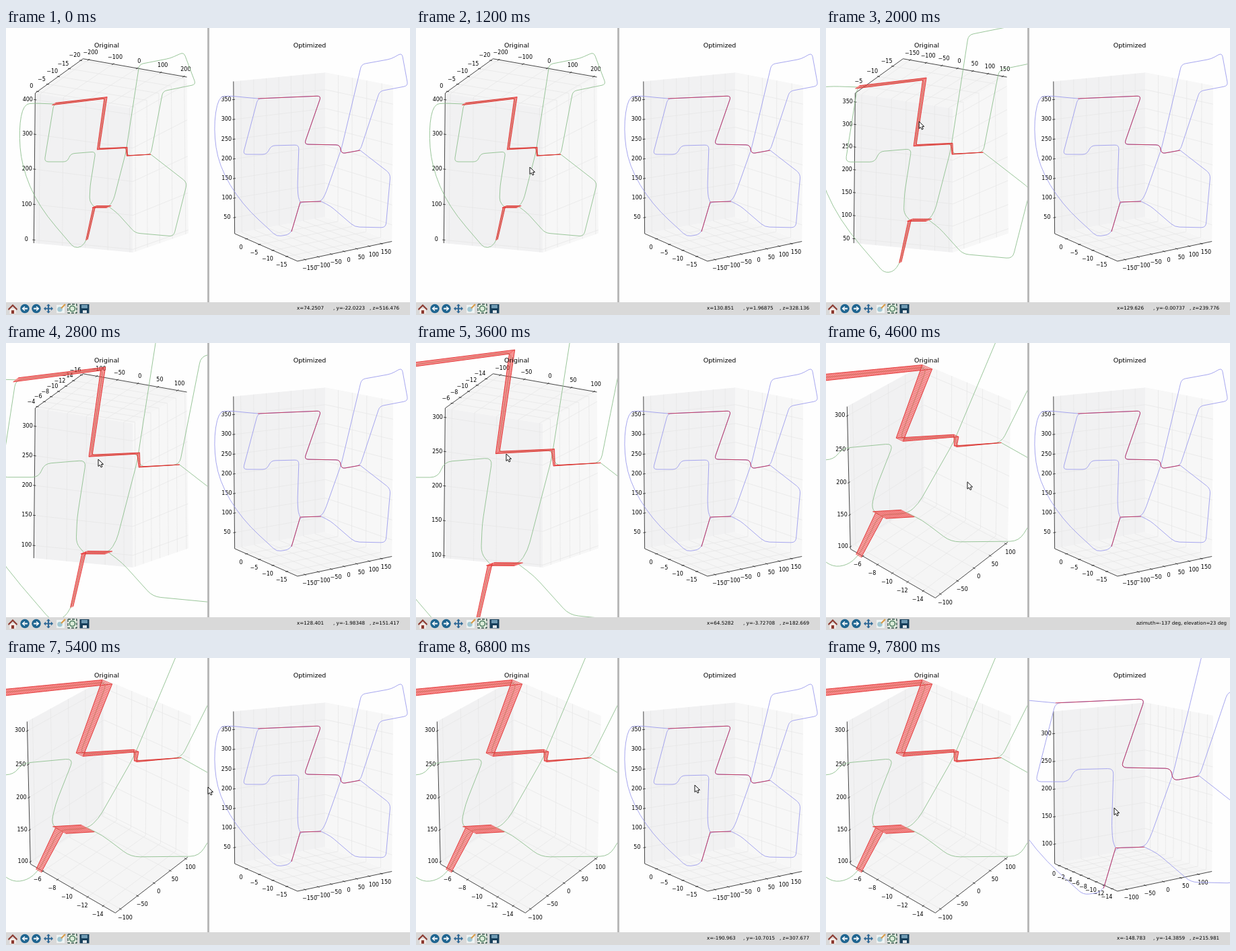
These frames come from a looping animation (600 by 427 pixels, 8000 ms). An HTML page with a canvas:

```html
<!DOCTYPE html>
<html lang="en">
<head>
<meta charset="utf-8">
<title>Trajectory comparison</title>
<style>
html, body { margin: 0; height: 100%; overflow: hidden; background: #fefefe; }
canvas { display: block; width: 100vw; height: 100vh; }
</style>
</head>
<body>
<canvas id="stage" width="600" height="427"></canvas>
<script>
const ctx = document.getElementById('stage').getContext('2d');
const LOOP = 8000, STEP = 200, FONT = '"DejaVu Sans", sans-serif';

const points = text => text.trim().split(/\s+/).map(p => p.split(',').map(Number));
const mix = (a, b, k) => a.map((v, i) => v + (b[i] - v) * k);
const dot = (a, b) => a.reduce((sum, v, i) => sum + v * b[i], 0);
const distance = (p, q) => Math.hypot(q[0] - p[0], q[1] - p[1]);

// Rows are [time, value, ...]; values run linearly between rows.
function track(t, rows) {
  const i = rows.findIndex(r => r[0] > t);
  if (i === 0) return rows[0].slice(1);
  if (i < 0) return rows[rows.length - 1].slice(1);
  const [a, b] = [rows[i - 1], rows[i]];
  return mix(a, b, (t - a[0]) / (b[0] - a[0])).slice(1);
}

// Perspective view of the unit cube from 10 units away.
const DIST = 10, PLANE = { normal: [.85, 1, .64], offset: .175 };
function camera(centerX, azimuth, elevation) {
  const [az, el] = [azimuth, elevation].map(deg => deg * Math.PI / 180);
  const [c, s] = [Math.cos(el), Math.sin(el)];
  const right = [-Math.sin(az), Math.cos(az), 0];
  const up = [-Math.cos(az) * s, -Math.sin(az) * s, c];
  const toEye = [Math.cos(az) * c, Math.sin(az) * c, s];
  return {
    project(p) {
      const k = DIST / (DIST - dot(p, toEye));
      return [centerX + 169 * k * dot(p, right), 198 - 232 * k * dot(p, up)];
    },
    // Puts a screen point onto the sloping plane that holds the route.
    lift([x, y]) {
      const a = (x - centerX) / 169 / DIST, b = (198 - y) / 232 / DIST;
      const ray = toEye.map((v, i) => a * right[i] + b * up[i] - v);
      const depth = (PLANE.offset - DIST * dot(PLANE.normal, toEye)) / dot(PLANE.normal, ray);
      return toEye.map((v, i) => DIST * v + depth * ray[i]);
    }
  };
}

const leftCamera = t => track(t, [[3600, -117, -11], [4200, -136, 22], [4600, -139, 24.5]]);
const RIGHT = camera(455, -125, 9);

// Corners as seen in the opening view: the loop, then the side branch.
const BRANCH = 30;
const leftRoute = points(`131,266 124,258 125,235 133,184 96,187 91,199 57,199
  71,113 148,104 137,180 179,178 180,190 215,188 233,94 282,84 264,36 244,45 198,54
  178,185 160,255 153,266 131,266 120,315 112,326 101,327 48,265 23,205 19,150 26,113 44,112
  269,230 249,310 192,305 165,275`).map(camera(153.6, ...leftCamera(0)).lift);
const rightRoute = points(`437,259 434,252 433,235 435,174 394,175 387,188 352,188
  374,105 468,101 443,173 496,174 498,187 526,182 555,94 597,86 588,37 572,46 528,54
  498,180 474,248 468,258 437,259 424,303 418,308 402,310 350,262 316,205 308,150 315,102 332,101
  571,217 564,297 518,296 482,265`).map(RIGHT.lift);

// Stretches driven twice, with the gap between both passes at either end.
const shared = [
  { from: 7, to: 12, gap: [1, 0] },
  { from: 20, to: 21, gap: [1.2, 1.2] },
  { from: 21, to: 22, gap: [.7, .5] }
];

function stroke(color, width) {
  ctx.strokeStyle = color;
  ctx.lineWidth = width;
  ctx.stroke();
}
function trace(pts) {
  ctx.beginPath();
  pts.forEach(p => ctx.lineTo(...p));
}
function strokePath(pts, color, width) {
  trace(pts);
  stroke(color, width);
}
function fillPath(pts, color) {
  trace(pts);
  ctx.fillStyle = color;
  ctx.fill();
}
const rect = (color, x, y, w, h) => fillPath([[x, y], [x + w, y], [x + w, y + h], [x, y + h]], color);

function strokeRounded(pts, radius, color, width) {
  ctx.beginPath();
  ctx.moveTo(...pts[0]);
  for (let i = 1; i < pts.length - 1; i++) {
    const toward = q => mix(pts[i], q, Math.min(radius(i) / distance(pts[i], q), .5));
    ctx.lineTo(...toward(pts[i - 1]));
    ctx.quadraticCurveTo(...pts[i], ...toward(pts[i + 1]));
  }
  ctx.lineTo(...pts[pts.length - 1]);
  stroke(color, width);
}

function label(text, x, y, size, align = 'center') {
  ctx.font = `${size}px ${FONT}`;
  ctx.textAlign = align;
  ctx.textBaseline = 'middle';
  ctx.fillStyle = '#000';
  ctx.fillText(text, x, y);
}

// axes: [centre, half range] for x, y and z at zoom 1
function drawAxes(project, axes, zoom, onFloor) {
  // u, v, w run from the maximum of x, y, z to the minimum
  const at = (...uvw) => project(uvw.map(k => .5 - k));
  const base = onFloor ? 1 : 0, far = 1 - base;
  const pane = (color, ...corners) => fillPath(corners.map(c => at(...c)), color);
  pane('#f5f5f5', [0, 0, base], [1, 0, base], [1, 1, base], [0, 1, base]);
  pane('#f1f1f2', [0, 0, 0], [1, 0, 0], [1, 0, 1], [0, 0, 1]);
  pane('#f7f7f7', [0, 0, 0], [0, 1, 0], [0, 1, 1], [0, 0, 1]);

  // Each grid line starts on its axis and folds over two panes.
  const lines = [
    u => [at(u, 1, base), at(u, 0, base), at(u, 0, far)],
    v => [at(1, v, base), at(0, v, base), at(0, v, far)],
    w => [at(1, 0, w), at(0, 0, w), at(0, 1, w)]
  ];
  const offsets = onFloor ? [[7, 13], [-8, 13], [-11, 0]] : [[3, -10], [-9, -7], [-11, 0]];
  const ticks = [];
  axes.forEach(([centre, half], k) => {
    const range = 2 * half / zoom, max = centre + range / 2;
    const step = [2, 5, 20, 50, 100].find(s => range / s < 8.5);
    for (let n = Math.ceil((max - range) / step); n * step <= max; n++) {
      const line = lines[k]((max - n * step) / range);
      strokePath(line, '#e6e6e6', .7);
      ticks.push({ line, value: n * step, offset: offsets[k] });
    }
  });
  lines.forEach(line => strokePath([line(0)[0], line(1)[0]], '#333', .9));
  for (const { line: [p, q], value, offset } of ticks) {
    const k = 2 / distance(p, q);
    strokePath([mix(p, q, -k), mix(p, q, k)], '#333', .9);
    label(String(value).replace('-', '\u2212'), p[0] + offset[0], p[1] + offset[1], 8);
  }
}

function drawRoute(route, zoom, color) {
  const wideBend = i => i >= 25 && i < 29;
  strokeRounded([...route.slice(0, BRANCH), route[7]], i => wideBend(i) ? 999 : 6 * zoom, color, .9);
  strokeRounded([route[12], ...route.slice(BRANCH), route[20]], () => 7 * zoom, color, .9);
}

function drawBand(route, project, { from, to, gap }) {
  const side = sign => route.slice(from, to + 1).map(([x, y, z], i) => {
    const [width] = mix([gap[0]], [gap[1]], i / (to - from));
    return project([x, y + sign * width * .035, z]);
  });
  const a = side(1), b = side(-1);
  fillPath([...a, ...b.slice().reverse()], 'rgba(245,70,70,.45)');
  for (let i = 1; i < a.length; i++) {
    const n = Math.ceil(distance(a[i - 1], a[i]) / 2.6);
    for (let j = 0; j <= n; j++)
      strokePath([mix(a[i - 1], a[i], j / n), mix(b[i - 1], b[i], j / n)], 'rgba(230,40,40,.55)', .8);
  }
  strokePath(a, '#e03030', .9);
  strokePath(b, '#e03030', .9);
}

function clipped(x, width, draw) {
  ctx.save();
  ctx.beginPath();
  ctx.rect(x, 0, width, 408);
  ctx.clip();
  draw();
  ctx.restore();
}

const scaled = (route, zoom) => route.map(p => p.map(v => v * zoom));

function drawLeft(t) {
  const [zoom] = track(t, [[1400, 1], [3340, 1.97]]);
  const [azimuth, elevation] = leftCamera(t);
  const { project } = camera(153.6, azimuth, elevation);
  const route = scaled(leftRoute, zoom);
  // the gap grows with the zoom
  const bandProject = ([x, y, z]) => project([x * zoom, y * zoom, z * zoom]);
  clipped(0, 299, () => {
    drawAxes(project, [[-4, 218], [-9.9, 11.1], [205, 214]], zoom, elevation > 0);
    drawRoute(route.map(project), zoom, '#8fc08f');
    shared.forEach(s => drawBand(leftRoute, bandProject, s));
  });
  label('Original', 149.5, 26.5, 9.5);
}

function drawRight(t) {
  const [zoom] = track(t, [[7000, 1], [7800, 1.405]]);
  const route = scaled(rightRoute, zoom).map(RIGHT.project);
  clipped(302, 298, () => {
    drawAxes(RIGHT.project, [[8, 186], [-7, 11.7], [202, 193.5]], zoom, true);
    drawRoute(route, zoom, '#9c9cee');
    for (const { from, to } of shared)
      strokeRounded(route.slice(from, to + 1), () => 6 * zoom, '#c03a62', 1);
  });
  label('Optimized', 451, 26.5, 9.5);
}

function disc(x, y, r, color) {
  ctx.beginPath();
  ctx.arc(x, y, r, 0, 7);
  ctx.fillStyle = color;
  ctx.fill();
}

function drawToolbar() {
  rect('#d9d9d9', 0, 408, 600, 19);
  rect('#b9b9b9', 299, 0, 3, 408);
  // home
  rect('#f1e8e4', 5, 417, 10, 8);
  fillPath(points('3,418 10,411 17,418 16,420 10,414 4,420'), '#8c3a30');
  rect('#8c3a30', 8, 420, 4, 5);
  // back and forward
  for (const [x, d] of [[28, -1], [45, 1]]) {
    disc(x, 417.5, 6.7, '#1f6590');
    strokePath([[x - 4 * d, 417.5], [x + 3 * d, 417.5]], '#fff', 2);
    strokePath([[x, 414.5], [x + 3.5 * d, 417.5], [x, 420.5]], '#fff', 1.5);
  }
  // pan: one arrow turned four ways
  for (let i = 0; i < 4; i++) {
    ctx.save();
    ctx.translate(63, 417.5);
    ctx.rotate(i * Math.PI / 2);
    fillPath(points('-1,0 -1,-4 -3,-4 0,-7 3,-4 1,-4 1,0'), '#2d6795');
    ctx.restore();
  }
  // zoom
  rect('#eef3f3', 75, 412, 12, 12);
  disc(80, 418.5, 3.8, '#a3c8d2');
  strokePath([[82, 417], [88, 411]], '#d99a45', 2.2);
  // subplots
  rect('#e6efe2', 92, 411, 13, 13);
  disc(98.5, 417.5, 4.8, '#4f7d63');
  disc(98.5, 417.5, 3.2, '#dcebd9');
  ctx.setLineDash([4, 2]);
  strokePath([[92, 411], [105, 411], [105, 424], [92, 424], [92, 411]], '#35544b', 1.3);
  ctx.setLineDash([]);
  // save
  rect('#173f5b', 109.5, 411, 14, 13.5);
  rect('#6f9bb4', 112, 412, 9, 5);
  rect('#dfe6ea', 114, 420, 6, 4);
}

function drawStatus(t) {
  const y = 417.5;
  if (t >= 3800 && t < 4800) {
    // the read-out trails the drag
    const [azimuth, elevation] = leftCamera(t - 320).map(Math.round);
    label(`azimuth=${azimuth} deg, elevation=${elevation} deg`, 595, y, 7.1, 'right');
  } else if (t < 5200 || t >= 6200) {
    const values = track(t, [
      [0, 74.2507, -22.0223, 516.476], [1200, 130.851, 1.96875, 328.136],
      [2800, 128.401, -1.98348, 151.417], [6800, -190.963, -10.7015, 307.677],
      [7800, -148.783, -14.3859, 215.981]
    ]).map(v => v.toFixed(5).slice(0, v < 0 ? 8 : 7));
    ['x=', ', y=', ', z='].forEach((name, i) =>
      label(name + values[i], 432 + i * 54, y, 7.2, 'left'));
  }
}

function drawCursor(t) {
  if (t < 200) return;
  const [x, y] = track(t, [
    [200, 130, 28], [1200, 169, 207], [1500, 139, 118], [2800, 137, 173],
    [3600, 134, 165], [4200, 165, 214], [5400, 300, 192], [6800, 414, 189], [7800, 428, 223]
  ]);
  ctx.save();
  ctx.translate(x, y);
  trace(points('0,0 0,10.5 2.4,8.4 4.2,12 6,11 4.4,7.6 7.6,7.4 0,0'));
  ctx.fillStyle = '#fff';
  ctx.fill();
  stroke('#111', 1);
  ctx.restore();
}

function frame() {
  const t = Math.floor(performance.now() % LOOP / STEP) * STEP;
  rect('#fefefe', 0, 0, 600, 427);
  ctx.lineJoin = 'round';
  drawLeft(t);
  drawRight(t);
  drawToolbar();
  drawStatus(t);
  drawCursor(t);
  requestAnimationFrame(frame);
}
frame();
</script>
</body>
</html>
```
